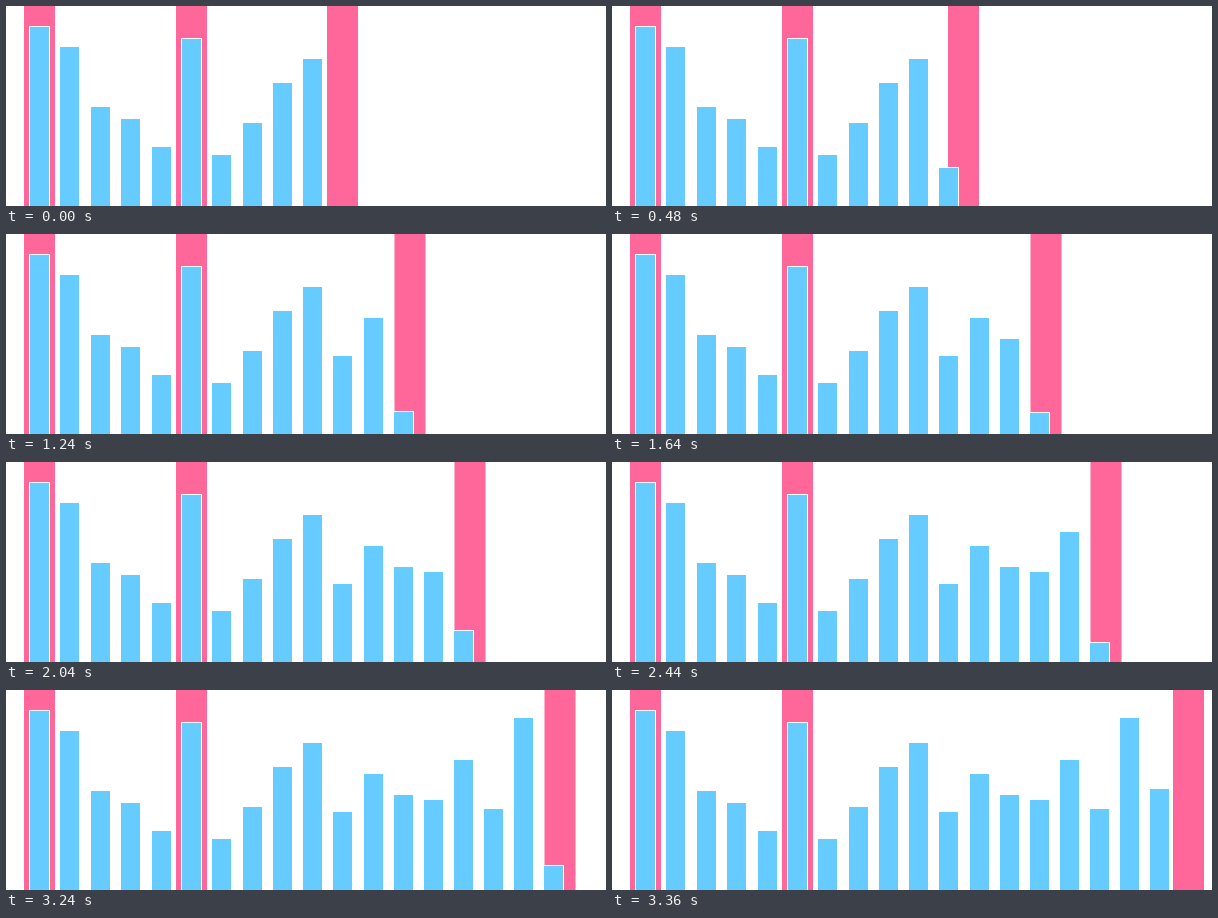
Write a matplotlib script that moves like this. It is 600x200 px and loops after 3.8 s.

```python
import math

import matplotlib.pyplot as plt
from matplotlib.animation import FuncAnimation
from matplotlib.patches import Rectangle

WIDTH, HEIGHT = 600, 200
INTERVAL, FRAMES = 40, 95
PINK, BLUE = "#ff6699", "#66ccff"

STRIPE_WIDTH, BAR_WIDTH = 31, 21
FIXED_STRIPES = (18, 170)
CURSOR_START, CURSOR_STEP = 321, 30
BASELINE = 201.5  # just below the visible area
INITIAL_BARS, NEW_BARS = 10, 8

bar_lefts = [23, 53, 84, 114, 145, 175, 205, 236, 266, 296, 326]
bar_lefts += [357 + 30 * k for k in range(7)]
bar_tops = [20, 40, 100, 112, 140, 32, 148, 116, 76,
            52, 121, 83, 104, 109, 69, 118, 27, 98]

fig = plt.figure(figsize=(WIDTH / 100, HEIGHT / 100), dpi=100, facecolor="white")
ax = fig.add_axes([0, 0, 1, 1])
ax.set(xlim=(0, WIDTH), ylim=(HEIGHT, 0))
ax.axis("off")


def add_rect(x, y, width, color, zorder):
    rect = Rectangle((x, y), width, HEIGHT + 5 - y, facecolor=color,
                     linewidth=0, snap=False, zorder=zorder)
    return ax.add_patch(rect)


def set_top(rect, y):
    rect.set_y(y)
    rect.set_height(HEIGHT + 5 - y)


for left in FIXED_STRIPES:
    add_rect(left, 0, STRIPE_WIDTH, PINK, 1)
cursor = add_rect(CURSOR_START, 0, STRIPE_WIDTH, PINK, 1)

# Each bar is a blue body over a white rectangle one pixel larger.
bars = [(add_rect(x, y, BAR_WIDTH, "white", 2),
         add_rect(x + 1, y + 1, BAR_WIDTH - 2, BLUE, 3))
        for x, y in zip(bar_lefts, bar_tops)]


def progress_at(frame):
    """Number of bars added: four linear steps, then a pause, every ten frames."""
    if frame < 11:
        return 0
    done, step = divmod(frame - 11, 10)
    return min(NEW_BARS, done + min(step + 1, 4) / 4)


def update(frame):
    progress = progress_at(frame)
    cursor.set_x(CURSOR_START + CURSOR_STEP * progress)
    for k in range(NEW_BARS):
        index = INITIAL_BARS + k
        growth = min(max(progress - k, 0), 1)
        top = math.floor(BASELINE + (bar_tops[index] - BASELINE) * growth)
        outline, body = bars[index]
        set_top(outline, top)
        set_top(body, top + 1)
        outline.set_visible(growth > 0)
        body.set_visible(growth > 0)
    return [cursor, *(part for bar in bars for part in bar)]


animation = FuncAnimation(fig, update, frames=FRAMES, interval=INTERVAL,
                          repeat=True, repeat_delay=0, blit=False)
plt.show()
```
